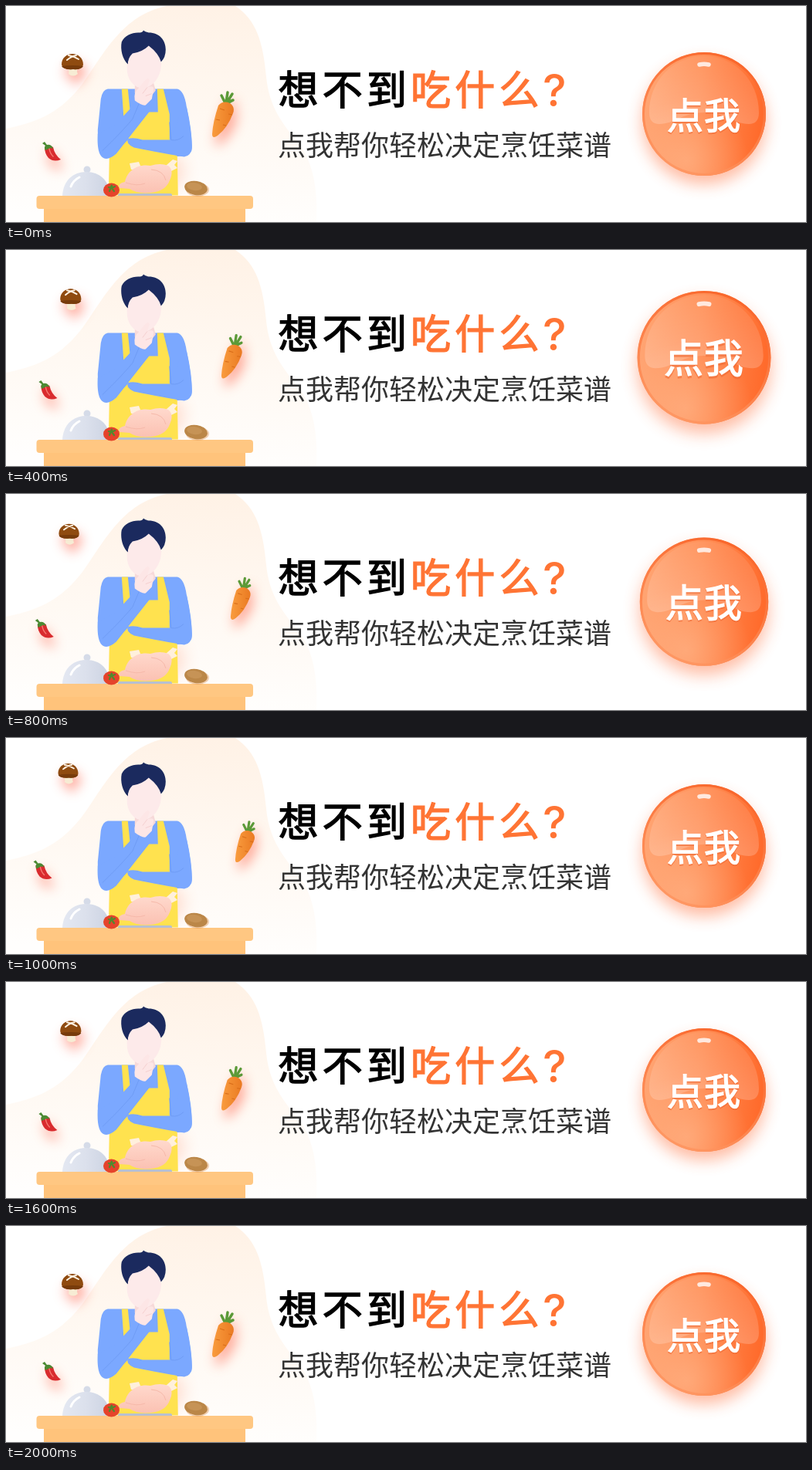
Recreate the animation shown at these times as an HTML page. Size 1036 px wide and 280 px high, loop 5000 ms.

```html
<!DOCTYPE html>
<html lang="zh-CN">
<head>
<meta charset="utf-8">
<title>想不到吃什么?</title>
<style>
html, body { margin: 0; width: 100%; height: 100%; overflow: hidden; background: #fff; }
svg { display: block; width: 1036px; height: 280px; }
text { font-family: "Noto Sans CJK SC", "Noto Sans CJK", sans-serif; }
.title { font-size: 52px; letter-spacing: 5.2px; stroke-width: 1.4px; }
.mark { font: 500 58px Inter, sans-serif; }
.veg { filter: drop-shadow(4px 11px 8px rgba(255, 70, 40, .45)); }
</style>
</head>
<body>
<svg viewBox="0 0 1036 280">
  <defs>
    <linearGradient id="cream" x1=".6" y1="0" x2=".5" y2="1">
      <stop offset="0" stop-color="#fff2e6"/><stop offset=".55" stop-color="#fff9f3"/><stop offset="1" stop-color="#fffefd"/>
    </linearGradient>
    <linearGradient id="orange" x2="1" y2=".1">
      <stop offset="0" stop-color="#ffa776"/><stop offset=".5" stop-color="#ff9058"/><stop offset="1" stop-color="#ff6b2c"/>
    </linearGradient>
    <linearGradient id="edge" x1=".2" y1="1" x2=".7" y2="0">
      <stop offset="0" stop-color="#ff9a66"/><stop offset="1" stop-color="#f9662b"/>
    </linearGradient>
    <radialGradient id="glow" cx=".36" cy=".88" r=".5">
      <stop offset="0" stop-color="#ffb78c" stop-opacity=".6"/><stop offset="1" stop-color="#ffb78c" stop-opacity="0"/>
    </radialGradient>
    <linearGradient id="gloss" x2="0" y2="1">
      <stop offset="0" stop-color="#fff" stop-opacity=".05"/><stop offset="1" stop-color="#fff" stop-opacity=".2"/>
    </linearGradient>
    <linearGradient id="steel">
      <stop offset="0" stop-color="#e4e8f2"/><stop offset=".5" stop-color="#dbe0ec"/><stop offset="1" stop-color="#ccd3e2"/>
    </linearGradient>
    <linearGradient id="meat" x2="0" y2="1">
      <stop offset="0" stop-color="#ffd9cd"/><stop offset="1" stop-color="#fbc1b2"/>
    </linearGradient>
    <linearGradient id="root">
      <stop offset="0" stop-color="#f99c3e"/><stop offset="1" stop-color="#ea7a22"/>
    </linearGradient>
    <filter id="blur" x="-50%" y="-50%" width="200%" height="200%"><feGaussianBlur stdDeviation="10"/></filter>
  </defs>

  <path fill="url(#cream)" d="M0 159C45 150 72 136 99 101C127 62 150 12 208 0H297C324 18 333 46 337 92C341 132 358 152 381 181C398 204 404 240 402 280H0Z"/>

  <!-- cook -->
  <ellipse cx="190" cy="215" rx="42" ry="28" fill="#ff7a50" opacity=".22" filter="url(#blur)"/>
  <g transform="translate(.8 .6)">
    <path fill="#7ba8ff" d="M131 107Q124 108 122 120L118 160Q118 192 128 195L215 194Q240 196 240 184Q240 165 233 130Q230 109 221 107Z"/>
    <path fill="#ffe24f" d="M149 107H157L160 137H196L195 107H203L211 140V172L221 195L222 245H132L133 196L158 172L152 150Z"/>
    <path fill="#f6d9d9" d="M166 98H190L193 109L178 128L166 112Z"/>
    <ellipse cx="178" cy="77" rx="22" ry="29" fill="#fdeaea" transform="rotate(10 178 77)"/>
    <path fill="#1b2a5e" d="M157 75C150 68 147 56 149 46C153 37 164 33 173 34Q177 33 177 31Q179 33 184 34C198 34 206 44 206 56Q206 66 200 72Q197 61 184 51Q176 59 163 61Q157 67 157 75Z"/>
    <path fill="#7ba8ff" d="M118 165C116 200 128 203 142 191L190 130L172 120L141 153Z"/>
    <path fill="none" stroke="#6f9cf5" d="M124 187Q148 164 163 146L173 122"/>
    <path fill="#fde6e6" d="M166 122Q164 111 171 106L180 95Q184 92 185 96L182 105Q192 101 190 109L188 120L180 128Q175 129 166 122Z"/>
    <path fill="none" stroke="#f5d0d0" d="M182 105L176 113M188 113L180 116"/>
    <path fill="#7ba8ff" d="M157 172Q163 169 176 173L213 173L225 138L233 130Q240 160 240 182Q239 194 230 195Q205 191 165 183Q154 178 157 172Z"/>
    <path fill="none" stroke="#6f9cf5" d="M211 150L213 173Q222 175 229 168"/>
  </g>

  <!-- table -->
  <rect x="145" y="243" width="70" height="5" rx="2" fill="#b7c0d0"/>
  <path fill="#fff0dc" d="M160 204L172 202L176 212H162ZM207 207L216 199L222 201L218 206L222 210L214 214Z"/>
  <path fill="url(#meat)" d="M147 236Q144 230 154 228C157 213 171 204 187 207Q200 203 210 207Q218 213 212 226Q207 240 188 242Q170 244 160 237Z"/>
  <path fill="none" stroke="#f6b9aa" d="M155 229Q170 234 180 230M188 212Q204 213 207 226"/>
  <rect x="49" y="262" width="261" height="18" fill="#ffc37b"/>
  <rect x="39.5" y="246" width="280.5" height="17" rx="4" fill="#ffc782"/>
  <circle cx="105" cy="212" r="4.5" fill="#d5dbe8"/>
  <path fill="url(#steel)" d="M73 246C74 226 87 215 104 215S134 226 135 246Z"/>
  <path fill="none" stroke="#fff" stroke-width="3" stroke-linecap="round" d="M84 234Q87 226 95 222"/>
  <ellipse cx="136.500" cy="238.500" rx="10.500" ry="9" fill="#e5432b"/>
  <path fill="none" stroke="#4f8b2e" stroke-width="2.200" stroke-linecap="round" d="M133 235L137 236L141 234M137 236V232L134 240M137 236L140 240"/>
  <ellipse cx="248" cy="238" rx="15" ry="9" fill="#d98a43" opacity=".4"/>
  <ellipse cx="246" cy="236" rx="15" ry="9" fill="#bb8748" transform="rotate(9 246 236)"/>
  <ellipse cx="244" cy="234" rx="10" ry="5" fill="#c69356" transform="rotate(9 244 234)"/>

  <!-- floating vegetables, each drawn around its own centre -->
  <g id="mushroom" class="veg">
    <path fill="#f7ecd4" d="M-6 4H7Q5 10 7 13Q1 18-5 13Q-4 9-6 4Z"/>
    <path fill="#8f4b10" d="M-14 1C-14-8-7-13 0-13S14-8 14 1Q13 8 1 7Q-13 8-14 1Z"/>
    <path fill="#773b0b" d="M-14 3Q0 1 14 3Q11 8 1 7Q-11 8-14 3Z"/>
    <path fill="none" stroke="#fff3e4" stroke-width="2" stroke-linecap="round" d="M-7-5Q-1-10 5-11M-5-11Q2-10 8-6"/>
  </g>
  <g id="carrot" class="veg">
    <path fill="none" stroke="#5b9a38" stroke-width="3.500" stroke-linecap="round" d="M3-14Q0-20-2-24M4-14Q5-22 6-28M5-14Q8-20 12-26M6-14Q10-17 13-18"/>
    <path fill="url(#root)" d="M-6-11Q0-18 9-14Q16-9 13-1Q6 18-7 28Q-14 33-14 26Q-13 10-6-11Z"/>
    <path fill="none" stroke="#d96d1a" stroke-width="1.200" d="M-4-7L2-5M7 0L12 1M-9 7L-4 8M0 14L4 15"/>
  </g>
  <g id="pepper" class="veg">
    <path fill="#d92b2e" d="M-9-5Q-4-9 2-5Q4 5 12 11Q3 15-4 9Q-9 3-9-5Z"/>
    <path fill="none" stroke="#f47a70" stroke-width="1.500" stroke-linecap="round" d="M-3-3Q-2 3 2 7"/>
    <path fill="#4b8a33" d="M-12-10L-9-12L-6-8Q0-9 2-3Q-2-5-4-3Q-6-2-8-1Q-10-5-8-7Z"/>
  </g>

  <!-- headline -->
  <text class="title" x="352.500" y="127.800" stroke="#000">想不到</text>
  <g fill="#ff7434">
    <text class="title" x="524" y="127.800" stroke="#ff7434">吃什么</text>
    <text class="mark" x="695" y="130">?</text>
  </g>
  <text x="352" y="194" font-size="36" fill="#333">点我帮你轻松决定烹饪菜谱</text>

  <g id="button">
    <circle cx="904" cy="151" r="80" fill="#ff6a35" opacity=".45" filter="url(#blur)"/>
    <circle cx="904" cy="140" r="80" fill="url(#orange)"/>
    <circle cx="904" cy="140" r="80" fill="url(#glow)"/>
    <circle cx="904" cy="140" r="78.500" fill="none" stroke="url(#edge)" stroke-width="3"/>
    <path fill="url(#gloss)" d="M833 138C833 96 865 65 904 65S975 96 975 138Q975 153 962 153C942 153 932 138 904 138S866 153 846 153Q833 153 833 138Z"/>
    <path fill="none" stroke="#ffe9df" stroke-width="5.500" stroke-linecap="round" d="M898 76Q904 74.500 910 76"/>
    <g font-size="47" letter-spacing="1" stroke-width="1.400">
      <text x="856" y="161" fill="#ef6a34" stroke="#ef6a34" opacity=".6">点我</text>
      <text x="856" y="158.500" fill="#fff" stroke="#fff">点我</text>
    </g>
  </g>
</svg>
<script>
const STEP = 100, LOOP = 5000, LAST = 20;
const mushroom = document.getElementById('mushroom');
const carrot = document.getElementById('carrot');
const pepper = document.getElementById('pepper');
const button = document.getElementById('button');

// Rises 0 to 1 and falls back over the given number of steps.
const swing = (step, span) => Math.max(0, 1 - Math.abs(2 * step / span - 1));

function place(el, x, y, scale) {
  el.setAttribute('transform', `translate(${x} ${y}) scale(${scale})`);
}

function draw(now) {
  const step = Math.min(LAST, Math.floor(now % LOOP / STEP));
  const lift = swing(step, 20);
  const press = 1 + 0.1 * swing(step, 10);
  place(mushroom, 86 - 5.5 * lift, 75 - 30 * lift, 1 - 0.07 * lift);
  place(carrot, 281 + 28.5 * lift, 140 - 6 * lift, 1 - 0.1 * lift);
  place(pepper, 59 - 11.5 * lift, 188 - 17.5 * lift, 1);
  place(button, 904 * (1 - press), 149 * (1 - press), press);
  requestAnimationFrame(() => draw(performance.now()));
}
draw(performance.now());
</script>
</body>
</html>
```
